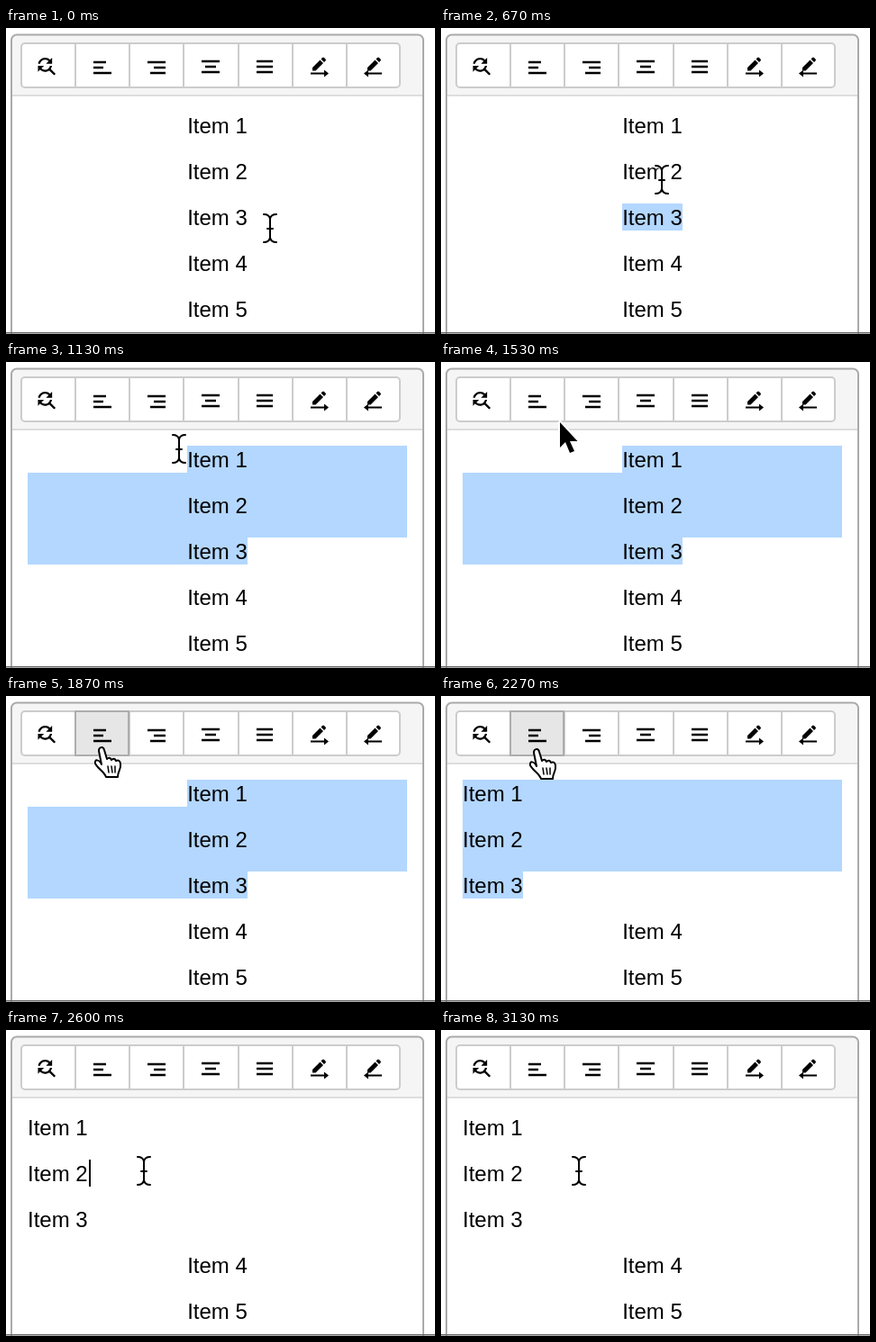
Write an HTML page that moves like this. It is 476 px wide and 340 px high and loops after 3.39 s.

```html
<!DOCTYPE html>
<html lang="en">
<head>
<meta charset="utf-8">
<title>List alignment</title>
<style>
  html, body { margin: 0; width: 100%; height: 100%; overflow: hidden; background: #fff; }
  svg { display: block; width: 476px; height: 340px; }
  text { font: 24px "Liberation Sans", Arial, Helvetica, sans-serif; }
  .cursor path { stroke-linejoin: round; stroke-linecap: round; }
</style>
</head>
<body>
<svg viewBox="0 0 476 340">
  <rect width="476" height="340" fill="#fff"/>
  <path d="M6 345V13.500a6 6 0 0 1 6-6H457a6 6 0 0 1 6 6V345" fill="#fff"/>
  <path d="M7 75V13a5 5 0 0 1 5-5H457a5 5 0 0 1 5 5V75z" fill="#f5f5f5"/>
  <rect x="7" y="74" width="455" height="2" fill="#ddd"/>
  <path d="M6 345V13.500a6 6 0 0 1 6-6H457a6 6 0 0 1 6 6V345" fill="none" stroke="#aaa" stroke-width="2"/>

  <rect x="17" y="17" width="420" height="49" rx="4" fill="#fff" stroke="#ccc" stroke-width="2"/>
  <g id="dividers" fill="#ccc"></g>
  <rect id="button" x="77" y="17" width="59" height="49" stroke-width="2"/>

  <path transform="translate(31 28.500) scale(1.120)" d="M11 6c1.380 0 2.630.560 3.540 1.460L12 10h6V4l-2.050 2.050C14.680 4.780 12.930 4 11 4c-3.530 0-6.430 2.610-6.920 6H6.100c.460-2.280 2.480-4 4.900-4zm5.640 9.140c.660-.9 1.120-1.970 1.280-3.140H15.900c-.460 2.280-2.480 4-4.900 4-1.380 0-2.630-.560-3.540-1.460L10 12H4v6l2.050-2.050C7.320 17.220 9.070 18 11 18c1.550 0 2.980-.510 4.140-1.360L20 21.490 21.490 20z"/>
  <g stroke="#000" stroke-width="2.600">
    <path d="M97 38h14M97 44h11M97 50h20"/>
    <path d="M157 38h20M164 44h13M160 50h17"/>
    <path d="M217 37h20M221 43h12M217 49h20"/>
    <path d="M278 37h18M278 43h18M278 49h18"/>
  </g>
  <g id="pens"></g>

  <path id="selection" fill="#b3d7ff"/>
  <g id="items"></g>
  <rect id="caret" width="2" height="30"/>
  <rect y="338" width="476" height="1.500" fill="#666"/>

  <g id="beam" class="cursor" fill="none">
    <path d="M-7-15Q-1-15 0-10Q1-15 7-15M0-10V11M-7 16Q-1 16 0 11Q1 16 7 16M-3 1H3" stroke="#fff" stroke-width="4" opacity=".8"/>
    <path d="M-7-15Q-1-15 0-10Q1-15 7-15M0-10V11M-7 16Q-1 16 0 11Q1 16 7 16M-3 1H3" stroke="#000" stroke-width="2"/>
  </g>
  <g id="arrow" class="cursor">
    <path d="M0 0V28L6 22L11 34L16 32L11 21H19.500z" stroke="#fff" stroke-width="4" paint-order="stroke"/>
  </g>
  <g id="hand" class="cursor" fill="#fff" stroke="#000" stroke-width="2">
    <path d="M-1 19L-4 4C-4-1 1-1 2 3L5 13Q8 10 10 14Q13 11 15 15Q19 13 20 18C21 25 17 26 17 33H4C2 27-5 24-8 18C-9 13-4 13-1 19z"/>
    <path d="M6 21L7 28M10 21L11 28M14 21V28" stroke-width="1.500"/>
  </g>
</svg>
<script>
const LOOP = 3390, TICK = 200 / 3;
const $ = id => document.getElementById(id);
const LEFT = 24, RIGHT = 445, CENTER = 201.150, ROW = 51;
const rowTop = i => 93 + ROW * i;

// Pointer path: tick, x, y
const path = [
  [8, 293, 222], [10, 245, 168], [12, 203, 112], [15, 192, 96], [20, 192, 96],
  [23, 132, 67], [24, 121, 61], [26, 110, 58], [28, 107, 57], [33, 107, 57],
  [34, 107, 59], [36, 128, 105], [38, 149, 150], [39, 153, 156]
];

$('dividers').innerHTML = [76, 136, 196, 257, 317, 377]
  .map(x => `<rect x="${x}" y="16" width="2" height="51"/>`).join('');

const pencil = '<path d="M0 12.500V9L8.500.500L12 4L3.500 12.500zM9.500-.500L11-2Q12-3 13-2L14.500-.500Q15.500.500 14.500 1.500L13 3z"/>';
$('pens').innerHTML =
  `<g transform="translate(340 35)">${pencil}<path d="M-2 14.500H13V11.500L18 15.500L13 19.500V16.500H-2z"/></g>
   <g transform="translate(401 35)">${pencil}<path d="M16 14.500H1V11.500L-4 15.500L1 19.500V16.500H16z"/></g>`;

$('items').innerHTML = [1, 2, 3, 4, 5]
  .map(n => `<text y="${66 + ROW * n}">Item ${n}</text>`).join('');
const items = [...$('items').children];

function pointerAt(tick) {
  const next = path.findIndex(p => p[0] >= tick);
  if (next < 0) return path[path.length - 1].slice(1);
  if (next === 0) return path[0].slice(1);
  const [t0, x0, y0] = path[next - 1], [t1, x1, y1] = path[next];
  const k = (tick - t0) / (t1 - t0);
  return [x0 + (x1 - x0) * k, y0 + (y1 - y0) * k];
}

// Selected area from x in the given row to the end of the third item
function selectionShape(row, x, end) {
  const top = rowTop(row), last = rowTop(2);
  if (row === 2) return `M${x} ${last}H${end}V${last + 30}H${x}z`;
  return `M${x} ${top}H${RIGHT}V${last}H${end}V${last + 30}H${LEFT}V${top + 30}H${x}z`;
}

function selectionAt(tick, aligned) {
  if (tick < 10 || tick >= 39) return '';
  if (aligned) return selectionShape(0, LEFT, 91);
  if (tick === 10) return selectionShape(2, 201, 268);
  if (tick === 11) return selectionShape(1, 230, 268);
  return selectionShape(0, tick === 12 ? 209 : 201, 268);
}

function caretAt(tick) {
  if (tick >= 2 && tick < 6) return [268, 94];
  if (tick >= 6 && tick < 10) return [268, 196];
  if (tick >= 39 && tick < 46) return [92, 144];
  return null;
}

function render(ms) {
  const tick = Math.floor((ms + 4) / TICK);
  const aligned = tick >= 31, pressed = tick === 30;
  const [x, y] = pointerAt(tick);

  items.forEach((el, i) => el.setAttribute('x', aligned && i < 3 ? LEFT : CENTER));
  $('selection').setAttribute('d', selectionAt(tick, aligned));

  const caret = caretAt(tick);
  $('caret').style.display = caret ? '' : 'none';
  if (caret) {
    $('caret').setAttribute('x', caret[0]);
    $('caret').setAttribute('y', caret[1]);
  }

  const hover = y < 66 && x > 76 && x < 137;
  const kind = hover ? 'hand' : y > 76 ? 'beam' : 'arrow';
  for (const id of ['beam', 'arrow', 'hand']) {
    $(id).style.display = id === kind ? '' : 'none';
  }
  $(kind).setAttribute('transform', `translate(${Math.round(x)} ${Math.round(y)})`);

  const button = $('button');
  button.style.display = hover ? '' : 'none';
  button.setAttribute('fill', pressed ? '#d4d4d4' : '#e6e6e6');
  button.setAttribute('stroke', pressed ? '#8c8c8c' : '#adadad');
}

const start = performance.now();
function frame() {
  render((performance.now() - start) % LOOP);
  requestAnimationFrame(frame);
}
render(0);
requestAnimationFrame(frame);
</script>
</body>
</html>
```
